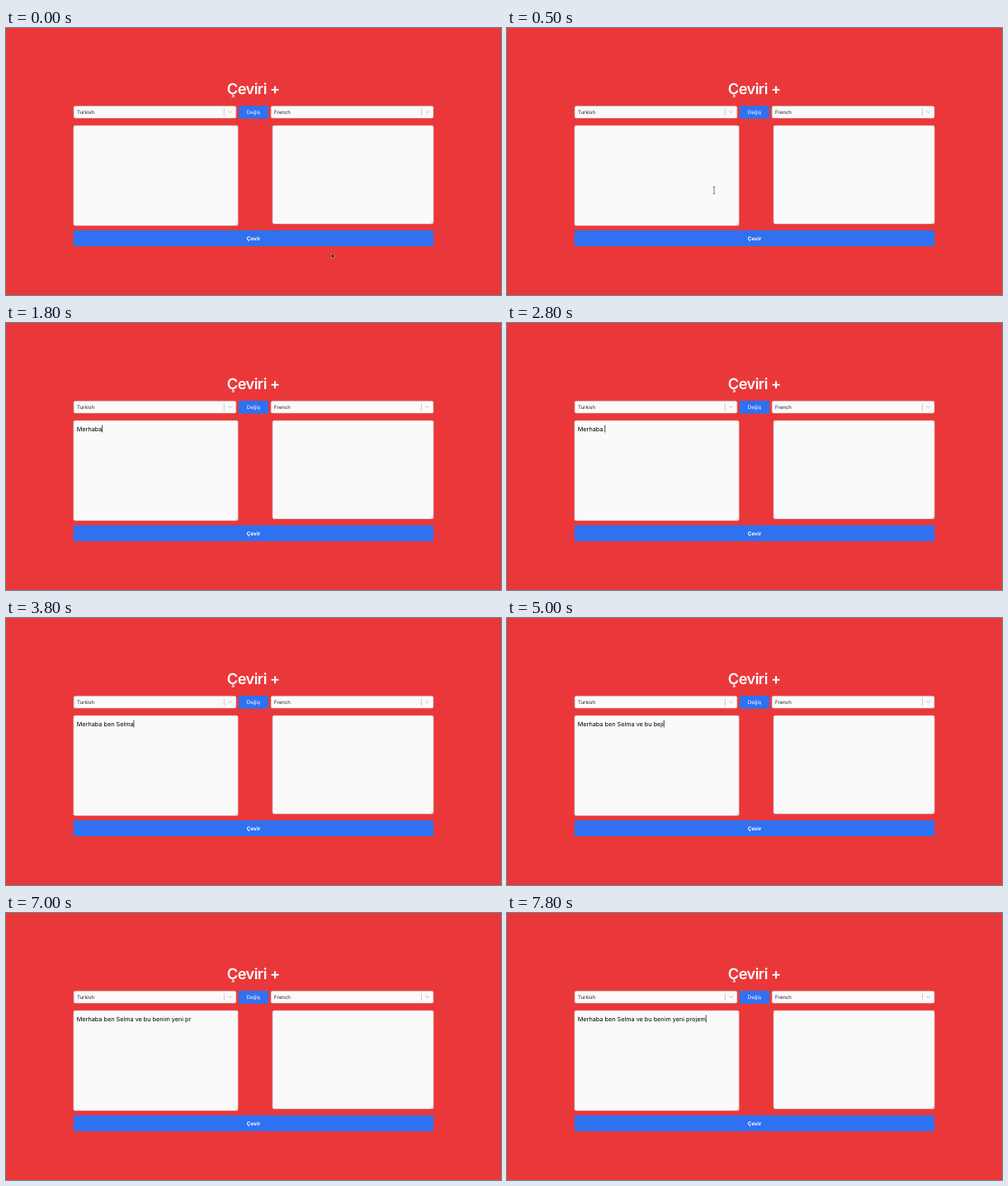
These frames come from a looping animation (600x323 px, 8000 ms). An HTML page:

```html
<!DOCTYPE html>
<html lang="tr">
<head>
<meta charset="utf-8">
<title>Çeviri +</title>
<style>
  html, body { margin: 0; width: 100%; height: 100%; overflow: hidden; background: #ea383a; }
  svg { display: block; width: 100%; height: 100%; }
  text { font-family: Inter, "Noto Sans", sans-serif; text-rendering: geometricPrecision; white-space: pre; }
  .field { fill: #fafafa; stroke: #c9c4c6; stroke-width: .5; }
  .blue { fill: #2f71f0; }
  .label { font-size: 6.06px; fill: #222; }
  .white { fill: #fff; text-anchor: middle; }
  .line { fill: none; stroke: #bbb; stroke-width: .8; }
</style>
</head>
<body>
<svg viewBox="0 0 600 323">
  <defs>
    <g id="select">
      <rect class="field" x=".25" y="94.4" width="196.7" height="14.6" rx="1.8"/>
      <path class="line" stroke-width=".5" d="M182.5 97.5v8.5"/>
      <path class="line" style="stroke-width:1" d="M187.4 100.5l2.2 2.2l2.2-2.2"/>
    </g>
    <path id="grip" class="line" style="stroke:#888;stroke-width:.4" d="M-3.4-.8l2.6-2.6M-1.8-.8l1-1"/>
  </defs>
  <text class="white" x="299.7" y="80.3" font-size="18.2" font-weight="600" letter-spacing="-.55">Çeviri +</text>

  <use href="#select" x="81.9"/>
  <use href="#select" x="321"/>
  <text class="label" x="86" y="104">Turkish</text>
  <text class="label" x="325.1" y="104">French</text>
  <rect class="blue" x="282" y="94" width="36" height="15.8" rx="1"/>
  <text class="white" x="300" y="104.3" font-size="6.2">Değiş</text>

  <rect class="field" x="81.9" y="118.1" width="199.3" height="121" rx="1.8"/>
  <rect class="field" x="323.1" y="118.1" width="195" height="118.8" rx="1.8"/>
  <use href="#grip" x="281.2" y="239.1"/>
  <use href="#grip" x="518.1" y="236.9"/>

  <rect class="blue" x="81.8" y="244.8" width="436.4" height="19.2" rx="1"/>
  <text class="white" x="300" y="256.6" font-size="6.4" font-weight="700">Çevir</text>

  <text id="typed" x="85.8" y="130.6" font-size="7.27"></text>
  <rect id="caret" y="123.4" width=".7" height="9"/>
  <path id="arrow" d="M0 0v5.4l1.2-1.1l.9 2l.9-.4l-.9-1.9h1.7z" stroke="#fff" stroke-width=".35"/>
  <path id="beam" d="M-1.2-4h2.4M0-4v8M-1.2 4h2.4" stroke="#222" stroke-width=".6"/>
</svg>
<script>
const $ = id => document.getElementById(id);
const typed = $("typed"), caret = $("caret"), arrow = $("arrow"), beam = $("beam");

// One press time (in tenths of a second) per key; "<" is backspace.
const keys = "Merhaba b<ben Selma ve bu beji<<nim yeni projem";
const times = [11, 12, 14, 15, 16, 17, 18, 19, 23, 25, 29, 30, 31, 32, 33, 34, 35, 36, 38, 40,
  42, 43, 44, 45, 46, 46, 48, 49, 50, 50, 51, 52, 54, 56, 59, 60, 61, 62, 63, 65, 67,
  67, 68, 73, 76, 77, 78];

function textAt(tick) {
  let s = "";
  times.forEach((t, i) => {
    if (t <= tick) s = keys[i] === "<" ? s.slice(0, -1) : s + keys[i];
  });
  return s.replace(/ /g, "\u00a0");
}

const show = (el, on) => el.setAttribute("visibility", on ? "visible" : "hidden");

function draw(tick) {
  typed.textContent = textAt(tick);
  caret.setAttribute("x", 85.8 + (typed.textContent ? typed.getComputedTextLength() : 0));
  show(caret, tick >= 9 && !(tick >= 70 && tick < 73));

  const p = Math.min(tick / 8, 1), ease = p * p * (3 - 2 * p);
  const x = 394.6 - 210 * ease, y = 272.8 - 112 * ease;
  const overText = x < 281 && y < 239;
  for (const el of [arrow, beam]) el.setAttribute("transform", `translate(${x} ${y})`);
  show(arrow, tick < 10 && !overText);
  show(beam, tick < 10 && overText);
}

const start = performance.now();
function frame() {
  draw(Math.floor((performance.now() - start) % 8000 / 100));
  requestAnimationFrame(frame);
}
frame();
</script>
</body>
</html>
```
